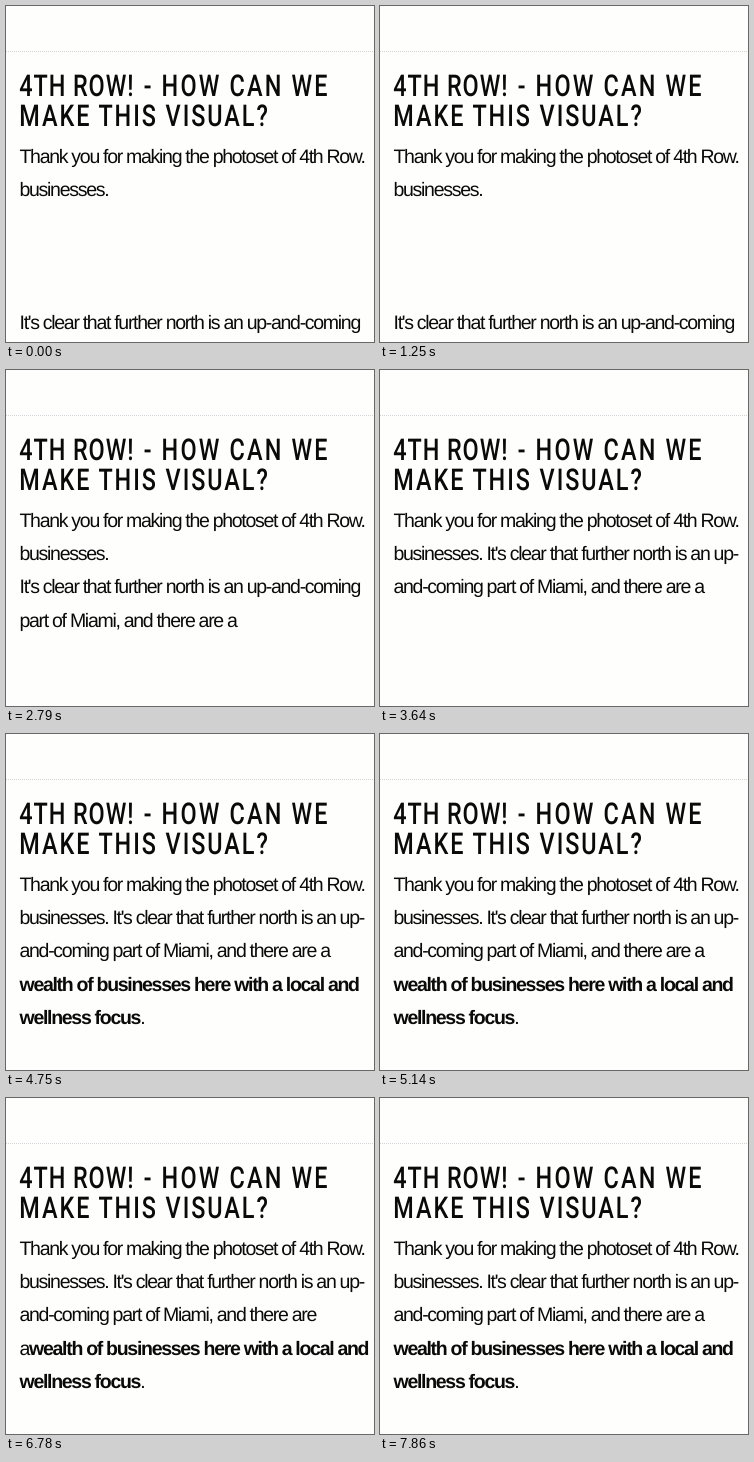
These frames come from a looping animation (368x336 px, 8000 ms). An HTML page:

```html
<!DOCTYPE html>
<html lang="en">
<head>
<meta charset="utf-8">
<title>Paragraph clean-up</title>
<style>
  html, body { margin: 0; width: 100%; height: 100%; overflow: hidden; background: #fefefd; }
  svg { display: block; width: 368px; height: 336px; }
  text { fill: #0a0a0a; white-space: pre; text-rendering: geometricPrecision; }
  .head { font: 560 30px Roboto, sans-serif; letter-spacing: 2.8px; }
  .name { letter-spacing: 1.2px; }
  .second { letter-spacing: 2.5px; }
  .body { font: 19.5px "Liberation Sans", Arial, sans-serif; letter-spacing: -1.29px; }
  .bold { font-weight: 700; }
</style>
</head>
<body>
<svg viewBox="0 0 368 336">
  <rect width="368" height="336" fill="#fefefd"/>
  <path d="M0 45.5H368" stroke="#d4d4d6" stroke-dasharray="1 1"/>
  <!-- narrow heading face -->
  <g class="head" transform="translate(13.3 0) scale(.78 1)">
    <text y="90"><tspan class="name">4TH ROW</tspan>! - HOW CAN WE</text>
    <text y="120" class="second">MAKE THIS VISUAL?</text>
  </g>
  <g class="body" id="body"></g>
</svg>
<script>
const LOOP = 8000, LEFT = 13.5, TOP = 156.7, PITCH = 33.3;
const NS = "http://www.w3.org/2000/svg";
const body = document.getElementById("body");

// *stars* mark bold runs
const opening = "Thank you for making the photoset of 4th Row.";
const clear = "It's clear that further north is an up-";
const miami = "part of Miami, and there are";
const wealth = "*wealth of businesses here with a local and*";
const focus = "*wellness focus*.";
const joined = [opening, "businesses. " + clear];
const full = [...joined, `and-coming ${miami} a`, wealth, focus];

// Each edit takes effect at once
const edits = [
  [0, [opening, "businesses.", "", "", "", clear + "and-coming"]],
  [2170, [opening, "businesses.", clear + "and-coming", miami + " a"]],
  [3180, full.slice(0, 3)],
  [4750, full],
  [6580, [...joined, "and-coming " + miami, "a" + wealth, focus]],
  [7170, full]
];

function add(parent, tag, attrs, content = "") {
  const el = document.createElementNS(NS, tag);
  for (const key in attrs) el.setAttribute(key, attrs[key]);
  el.textContent = content;
  return parent.appendChild(el);
}

function showLines(lines) {
  body.replaceChildren();
  lines.forEach((line, row) => {
    if (!line) return;
    const text = add(body, "text", { x: LEFT, y: Math.round(TOP + row * PITCH) });
    line.split("*").forEach((run, i) => {
      if (run) add(text, "tspan", i % 2 ? { class: "bold" } : {}, run);
    });
  });
}

let shown = null;
function draw(ms) {
  const lines = edits.filter(([start]) => start <= ms).pop()[1];
  if (lines === shown) return;
  shown = lines;
  showLines(lines);
}

const began = performance.now();
function tick() {
  draw((performance.now() - began) % LOOP);
  requestAnimationFrame(tick);
}
tick();
</script>
</body>
</html>
```
